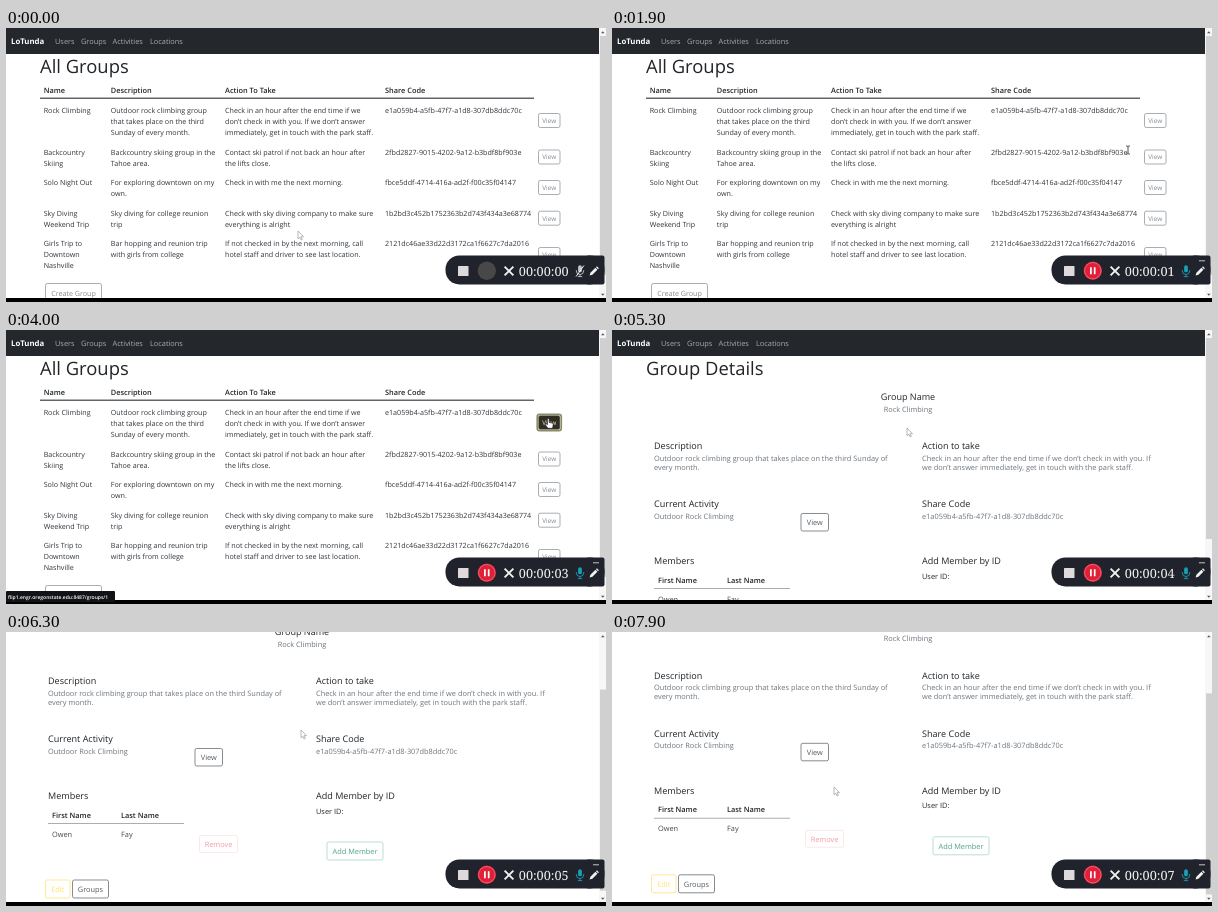
These frames come from a looping animation (600 px wide and 274 px high, 8000 ms). An HTML page:

```html
<!DOCTYPE html>
<html lang="en">
<head>
<meta charset="utf-8">
<title>Group check-in demo</title>
<style>
html, body { margin: 0; width: 100%; height: 100%; overflow: hidden; background: #fff; }
svg { display: block; width: 100%; height: 100%; }
text { font-family: "Open Sans", "Noto Sans", sans-serif; text-rendering: geometricPrecision; white-space: pre; }
.clock { font-family: "Noto Serif", serif; }
</style>
</head>
<body>
<svg id="stage" viewBox="0 0 600 274"></svg>
<script>
const NS = "http://www.w3.org/2000/svg";
const LOOP = 8000, OPEN_AT = 5200;
const INK = "#212529", MUTED = "#6c757d", SOFT = "#858b91";
const CELL = 7.15, BODY = 7.38, HEAD = 9.05, TITLE = 18.4;
const stage = document.getElementById("stage");

function add(parent, tag, attrs = {}, content) {
  const el = document.createElementNS(NS, tag);
  for (const key in attrs) el.setAttribute(key, attrs[key]);
  if (content !== undefined) el.textContent = content;
  parent.appendChild(el);
  return el;
}
const group = (parent) => add(parent, "g");
const rect = (parent, x, y, width, height, fill, more = {}) =>
  add(parent, "rect", { x, y, width, height, fill, ...more });
const path = (parent, d, more) => add(parent, "path", { d, fill: "none", ...more });

// y is the middle of the capital letters
function label(parent, x, y, words, size = BODY, fill = INK, more = {}) {
  return add(parent, "text", { x, y: y + size * 0.36, "font-size": size, fill, ...more }, words);
}
const lines = (parent, x, y, step, list, size, fill) =>
  list.forEach((words, i) => label(parent, x, y + i * step, words, size, fill));
const heading = (parent, x, y, words, size, more = {}) =>
  label(parent, x, y, words, size, INK, { "font-weight": 500, ...more });
const columnHead = (parent, x, y, words) =>
  label(parent, x, y, words, BODY, INK, { "font-weight": 600 });

function button(parent, x, y, w, h, words, color, size = BODY) {
  const g = group(parent);
  const box = rect(g, x + 0.5, y + 0.5, w - 1, h - 1, "#fff", { rx: 1.8, stroke: color, "stroke-width": 0.7 });
  const caption = label(g, x + w / 2, y + h / 2 + 0.1, words, size, color, { "text-anchor": "middle" });
  return { box, caption };
}

function navbar(parent) {
  rect(parent, 0, 0, 593, 26, "#24282c");
  label(parent, 5, 13.6, "LoTunda", 7.8, "#fff", { "font-weight": 700 });
  [["Users", 49], ["Groups", 75], ["Activities", 106.5], ["Locations", 144]]
    .forEach(([words, x]) => label(parent, x, 13.6, words, BODY, "#a9abad"));
}

// List of groups
const listPage = group(stage);
rect(listPage, 0, 0, 600, 274, "#fff");
navbar(listPage);
heading(listPage, 34, 38.6, "All Groups", TITLE);
const columns = [37.7, 104.8, 219, 379];
["Name", "Description", "Action To Take", "Share Code"].forEach((words, i) =>
  columnHead(listPage, columns[i], 62.3, words));
rect(listPage, 34, 69.6, 494, 1.2, "#3c4044");

const rows = [
  [82, 85, ["Rock Climbing"],
    ["Outdoor rock climbing group", "that takes place on the third", "Sunday of every month."],
    ["Check in an hour after the end time if we", "don’t check in with you. If we don’t answer", "immediately, get in touch with the park staff."],
    ["e1a059b4-a5fb-47f7-a1d8-307db8ddc70c"]],
  [124, 121.5, ["Backcountry", "Skiing"],
    ["Backcountry skiing group in the", "Tahoe area."],
    ["Contact ski patrol if not back an hour after", "the lifts close."],
    ["2fbd2827-9015-4202-9a12-b3bdf8bf903e"]],
  [154.7, 152, ["Solo Night Out"],
    ["For exploring downtown on my", "own."],
    ["Check in with me the next morning."],
    ["fbce5ddf-4714-416a-ad2f-f00c35f04147"]],
  [185.2, 182.7, ["Sky Diving", "Weekend Trip"],
    ["Sky diving for college reunion", "trip"],
    ["Check with sky diving company to make sure", "everything is alright"],
    ["1b2bd3c452b1752363b2d743f434a3e68774"]],
  [215.8, 219, ["Girls Trip to", "Downtown", "Nashville"],
    ["Bar hopping and reunion trip", "with girls from college"],
    ["If not checked in by the next morning, call", "hotel staff and driver to see last location."],
    ["2121dc46ae33d22d3172ca1f6627c7da2016"]]
];
const views = rows.map(([y, buttonY, ...cells]) => {
  cells.forEach((cell, i) => lines(listPage, columns[i], y, 11, cell, CELL, "#30343a"));
  return button(listPage, 532, buttonY, 22.5, 15, "View", SOFT, 6.4);
});
const ring = rect(listPage, 531.2, 84.2, 24.1, 16.6, "none",
  { rx: 2.5, stroke: "#8f8b60", "stroke-width": 1.6 });
button(listPage, 39, 255, 57, 20, "Create Group", SOFT, CELL);

// Details of one group
const detailPage = group(stage);
rect(detailPage, 0, 0, 600, 360, "#fff");
navbar(detailPage);
heading(detailPage, 34, 38.6, "Group Details", TITLE);
heading(detailPage, 296, 67, "Group Name", HEAD, { "text-anchor": "middle" });
label(detailPage, 296, 79, "Rock Climbing", BODY, MUTED, { "text-anchor": "middle" });

function section(x, y, title, ...text) {
  heading(detailPage, x, y, title, HEAD);
  lines(detailPage, x, y + 12, 9, text, BODY, MUTED);
}
section(42, 116, "Description",
  "Outdoor rock climbing group that takes place on the third Sunday of", "every month.");
section(310, 116, "Action to take",
  "Check in an hour after the end time if we don’t check in with you. If", "we don’t answer immediately, get in touch with the park staff.");
section(42, 174, "Current Activity", "Outdoor Rock Climbing");
section(310, 174, "Share Code", "e1a059b4-a5fb-47f7-a1d8-307db8ddc70c");
section(42, 231, "Members");
section(310, 231, "Add Member by ID");
button(detailPage, 188.5, 183, 28.5, 18.5, "View", "#555b61");
label(detailPage, 310, 246, "User ID:");
columnHead(detailPage, 46, 250, "First Name");
columnHead(detailPage, 115, 250, "Last Name");
rect(detailPage, 42, 258, 136, 0.8, "#999");
label(detailPage, 46, 269, "Owen", BODY, "#44484c");
label(detailPage, 115, 269, "Fay", BODY, "#44484c");
const remove = button(detailPage, 193, 270, 39, 18, "Remove", "#f29aa4");
remove.box.setAttribute("stroke", "#fadfe2");
const join = button(detailPage, 320.5, 276.5, 57, 19, "Add Member", "#4fa583");
join.box.setAttribute("stroke", "#9cd3bb");
button(detailPage, 39, 314.5, 25.5, 19, "Edit", "#ffe06a");
button(detailPage, 66, 314.5, 37, 19, "Groups", "#555b61");

// Browser edges
rect(stage, 593, 0, 7, 270, "#f7f7f7");
const thumb = rect(stage, 594, 8, 6, 200, "#d0d0d0");
path(stage, "M595 5.2l1.8-2 1.8 2zM595 265.8l1.8 2 1.8-2z", { fill: "#555" });
rect(stage, 0, 270, 600, 4, "#000");
const status = group(stage);
rect(status, 0, 261, 109, 11, "#111316", { rx: 1 });
label(status, 2, 267, "flip1.engr.oregonstate.edu:8487/groups/1", 5, "#fff", { "font-weight": 600 });

// Recorder
const recorder = group(stage);
rect(recorder, 439.5, 227.5, 159, 29, "#20222c", { rx: 14 });
rect(recorder, 580, 227.5, 18.5, 29, "#20222c", { rx: 2 });
rect(recorder, 452, 238, 10.5, 10, "#ded9da", { rx: 0.6 });
const disc = add(recorder, "circle", { cx: 480.8, cy: 242.7, r: 9.2 });
const armed = group(recorder);
add(armed, "circle", { cx: 480.8, cy: 242.7, r: 8.2, fill: "none", stroke: "#ee8e9a", "stroke-width": 0.6 });
path(armed, "M478.9 239.2v7M482.7 239.2v7", { stroke: "#fff", "stroke-width": 1.7 });
path(armed, "M587 232.8h6", { stroke: "#d8d8d8", "stroke-width": 0.9 });
path(recorder, "M498.6 238.6l8.8 8.8M507.4 238.6l-8.8 8.8", { stroke: "#f2f2f2", "stroke-width": 1.9 });
const clock = label(recorder, 512.8, 243, "", 12.7, "#f2f2f2", { class: "clock" });
const mic = group(recorder);
rect(mic, 572.1, 237.3, 3.8, 7, "currentColor", { rx: 1.9 });
path(mic, "M570.3 242v.8a3.7 3.7 0 0 0 7.4 0V242M574 246.5v2M571.8 248.6h4.4",
  { stroke: "currentColor", "stroke-width": 0.9 });
const mute = path(recorder, "M570 248.5l8-11", { stroke: "#f2f2f2", "stroke-width": 1 });
path(recorder, "M583.6 247.6l.8-2.8 5-5 2 2-5 5zM590 239.2l.9-.9 2 2-.9.9z", { fill: "#f2f2f2" });

// Pointer shapes, each with its hot spot at 0,0
const pointer = group(stage);
const shapes = {
  arrow: path(pointer, "M0 0v7.8l1.8-1.6 1.3 2.8 1.2-.6-1.3-2.7h2.5z",
    { fill: "#fff", stroke: "#999", "stroke-width": 0.7 }),
  beam: path(pointer, "M-2-4h1.5l.5.5.5-.5H2M0-3.5v7M-2 4h1.5l.5-.5.5.5H2",
    { stroke: "#222", "stroke-width": 0.8 }),
  hand: path(pointer, "M-.9 0a.9.9 0 0 1 1.8 0v3l3 .6q1.2.4 1 1.6l-.6 3.6h-4.6l-2.8-3.6q.2-1.2 1.4-.6l.8.7z",
    { fill: "#fff", stroke: "#111", "stroke-width": 0.6 })
};

// Keys are [time, value, ...]; each stretch is eased
function along(keys, t) {
  const next = keys.findIndex(([at]) => at > t);
  if (next < 0) return keys[keys.length - 1].slice(1);
  if (next === 0) return keys[0].slice(1);
  const a = keys[next - 1], b = keys[next];
  const k = (t - a[0]) / (b[0] - a[0]);
  const e = k * k * (3 - 2 * k);
  return a.slice(1).map((v, i) => v + (b[i + 1] - v) * e);
}
const pointerKeys = [
  [1000, 292, 203], [1900, 516, 122], [2100, 516, 122], [2700, 542.3, 89.5],
  [4300, 542.3, 89.5], [5100, 295, 98], [7000, 295, 98], [7600, 246, 184], [7800, 234, 173], [7900, 222, 155]
];
const scrollKeys = [[5300, 0], [5500, 46], [5600, 58], [6050, 58], [6300, 67], [6500, 72.2]];

const show = (el, on) => el.setAttribute("display", on ? "inline" : "none");

function draw(t) {
  const opened = t >= OPEN_AT;
  const hover = t >= 2550 && t < 4400;
  const recording = t >= 450;

  show(listPage, !opened);
  show(detailPage, opened);
  const [scroll] = along(scrollKeys, t);
  detailPage.setAttribute("transform", `translate(0 ${-scroll})`);
  thumb.setAttribute("y", 8 + scroll * 0.74);
  thumb.setAttribute("height", opened ? 201 : 239);

  views[0].box.setAttribute("fill", hover ? "#2f2e20" : "#fff");
  views[0].caption.setAttribute("fill", hover ? "#f0eed0" : SOFT);
  show(ring, t >= 3700);
  show(status, hover);

  disc.setAttribute("fill", recording ? "#df2038" : "#484848");
  show(armed, recording);
  show(mute, !recording);
  mic.setAttribute("color", recording ? "#199fb3" : "#c4c4c8");
  const seconds = Math.max(0, Math.floor((t - 450) / 1000));
  clock.textContent = "00:00:0" + seconds;

  const [x, y] = along(pointerKeys, t);
  pointer.setAttribute("transform", `translate(${x} ${y})`);
  const kind = hover ? "hand" : t >= 1700 && t < 2400 ? "beam" : "arrow";
  for (const name in shapes) show(shapes[name], name === kind);
}

const start = performance.now();
function tick() {
  draw((performance.now() - start) % LOOP);
  requestAnimationFrame(tick);
}
tick();
</script>
</body>
</html>
```
